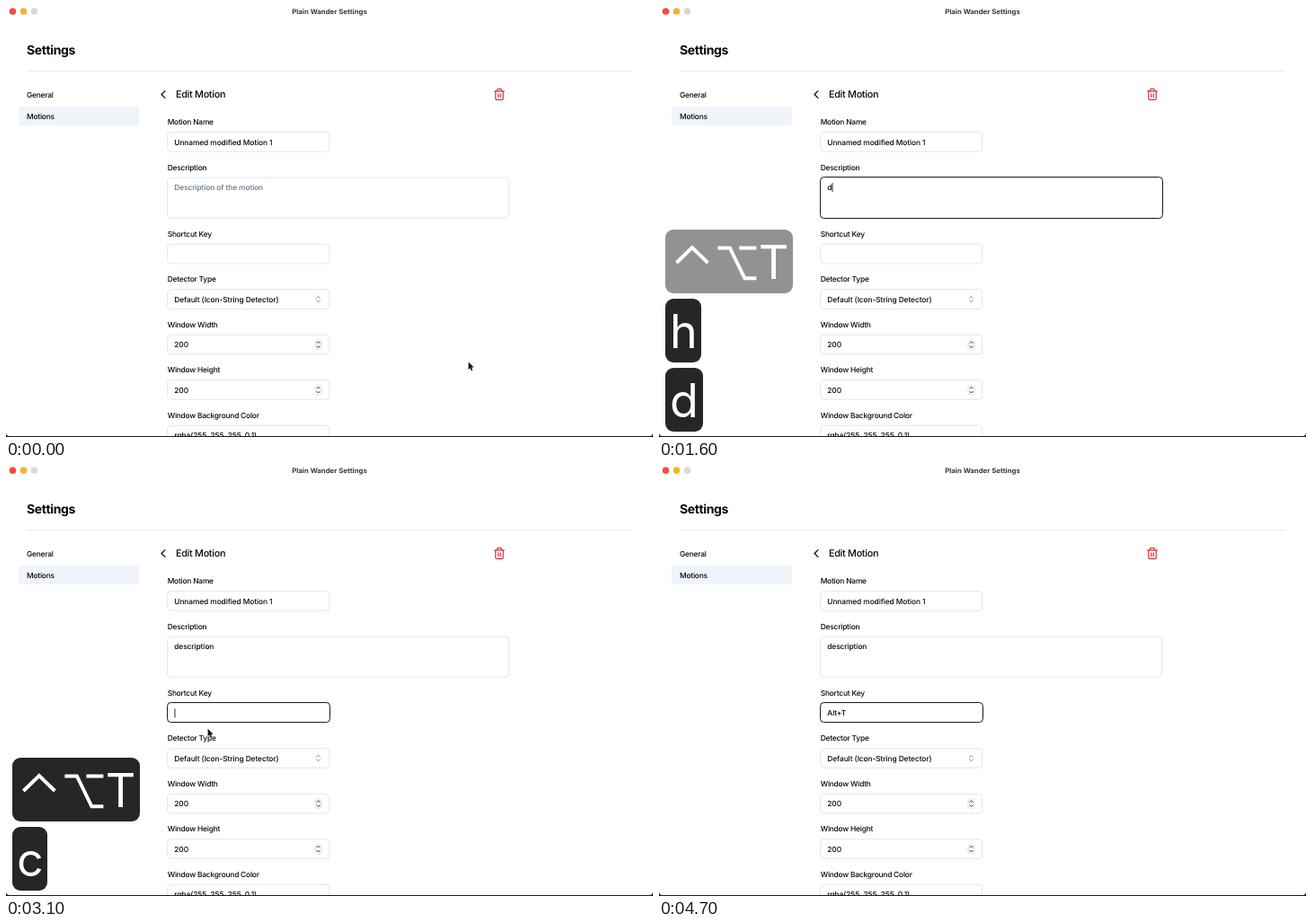
An HTML page for the animation above (4.8 s loop, 720 px wide and 480 px high).

```html
<!DOCTYPE html>
<html lang="en">
<head>
<meta charset="utf-8">
<title>Plain Wander Settings</title>
<style>
  html, body { margin: 0; width: 100%; height: 100%; overflow: hidden; background: #fff; }
  #stage { position: absolute; left: 0; top: 0; display: block; }
  text { font: 450 8.4px Inter, sans-serif; letter-spacing: -.012em; fill: #05070d; white-space: pre; text-rendering: geometricPrecision; }
  .label { font-weight: 550; letter-spacing: -.025em; }
  .hint { fill: #64748b; }
  .title { font-size: 7.8px; font-weight: 700; letter-spacing: 0; fill: #3a3a3a; text-anchor: middle; }
  .head { font-size: 14px; font-weight: 700; letter-spacing: -.025em; }
  .sub { font-size: 10.8px; font-weight: 550; letter-spacing: -.026em; }
  .tag { font: bold 9.5px "DejaVu Sans Mono", monospace; letter-spacing: 0; text-anchor: middle; fill: #15100a; }
  .box { fill: #fff; stroke: #e2e6ec; }
  #ring { fill: none; stroke: #1c202b; }
  .line { fill: none; stroke: #0b0f1a; stroke-width: 2; stroke-linecap: round; stroke-linejoin: round; }
  #keys { position: absolute; left: 6.5px; bottom: 6.5px; display: flex; flex-direction: column; align-items: flex-start; gap: 6.5px; }
  .key { display: flex; box-sizing: border-box; height: 70.5px; padding: 0 7.3px 0 5.6px; border-radius: 9px; background: rgba(0,0,0,.85); color: #fff;
    font: 52px/74px Inter, sans-serif; letter-spacing: -.052em; white-space: pre; overflow: hidden; }
  .key svg { flex: none; height: 70.5px; fill: none; stroke: #fff; stroke-width: 3.9; }
</style>
</head>
<body>
<svg id="stage" width="720" height="480" viewBox="0 0 720 480">
  <circle cx="7.5" cy="6" r="3.8" fill="#fa4a42"/>
  <circle cx="19.5" cy="6" r="3.8" fill="#f5b32e"/>
  <circle cx="31.5" cy="6" r="3.8" fill="#d9d9d9"/>
  <text class="title" x="360" y="8.8">Plain Wander Settings</text>
  <text class="head" x="23" y="54">Settings</text>
  <path d="M23 72.5H697" stroke="#e6e9ee"/>
  <rect x="14" y="112" width="134" height="21" rx="3" fill="#eff3fa"/>
  <text class="label" x="23" y="101.5">General</text>
  <text class="label" x="23" y="125.5">Motions</text>
  <path class="line" transform="translate(167.2 90.7) scale(.65)" d="M15 18 9 12 15 6"/>
  <text class="sub" x="189" y="102">Edit Motion</text>
  <path class="line" style="stroke:#d42f36" transform="translate(541.8 91.2) scale(.6)"
    d="M3 6H21M19 6V20C19 21 18 22 17 22H7C6 22 5 21 5 20V6M8 6V4C8 3 9 2 10 2H14C15 2 16 3 16 4V6M10 11V17M14 11V17"/>
  <g id="form"></g>
  <path class="line" opacity=".6" transform="translate(342.7 321.7) scale(.4)" d="M7 15 12 20 17 15M7 9 12 4 17 9"/>
  <rect id="ring" rx="4"/>
  <rect id="caret" width=".9" height="10" fill="#0b0f1a"/>
  <path d="M0 475.5Q.5 479 4 479H716Q719.5 479 720 475.5V480H0Z" fill="#1c1c1c"/>
  <g id="panel">
    <rect x="-30" y="-30" width="60" height="59.4" fill="#000" fill-opacity=".085"/>
    <g id="tags"></g>
  </g>
  <path id="pointer" d="M.6 1V9.4L2.5 7.7 3.8 10.7 5.3 10 4 7.1H6.6Z" fill="#111" stroke="#fff" stroke-width=".8" paint-order="stroke"/>
</svg>
<div id="keys"></div>
<script>
const LOOP = 4800, STEP = 100;
const $ = id => document.getElementById(id);
const setAll = (el, attrs) => { for (const k in attrs) el.setAttribute(k, attrs[k]); };

// Form: label, label baseline, value, box height, box width
const fields = [
  ['Motion Name', 132, 'Unnamed modified Motion 1'],
  ['Description', 182.5, '', 45, 380],
  ['Shortcut Key', 256.7, ''],
  ['Detector Type', 307.1, 'Default (Icon-String Detector)'],
  ['Window Width', 357.6, '200'],
  ['Window Height', 408.1, '200'],
  ['Window Background Color', 458.6, 'rgba(255, 255, 255, 0.1)']
];
$('form').innerHTML = fields.map(([label, y, value, h = 21.6, w = 180]) => `
  <text class="label" x="179.7" y="${y}">${label}</text>
  <rect class="box" x="179.7" y="${y + 8.6}" width="${w}" height="${h}" rx="3.6"/>
  <text class="value" x="187.3" y="${y + 22.6}">${value}</text>
  ${value === '200' ? `<g transform="translate(347.6 ${y + 19.5})">
    <rect x="-3.7" y="-5.3" width="7.4" height="10.6" rx="3" fill="#fff" stroke="#d6d6d6" stroke-width=".7"/>
    <path class="line" style="stroke-width:.9" d="M-1.7 -1.7 0 -3.4 1.7 -1.7M-1.7 1.7 0 3.4 1.7 1.7"/></g>` : ''}`).join('');
const values = document.querySelectorAll('.value');

$('tags').innerHTML = [...'bcdeafghi'].map((c, i) => {
  const x = (i % 3 - 1) * 23.5, y = (Math.floor(i / 3) - 1) * 23.4 - 1;
  return `<rect x="${x - 3.8}" y="${y - 4.7}" width="7.6" height="9.4" rx="1" fill="#efaa22"/>
    <text class="tag" x="${x}" y="${y + 2.8}">${c}</text>`;
}).join('');

// Typing: [time, characters shown]
const typed = (word, marks, t) => word.slice(0, marks.reduce((n, [at, len]) => t >= at ? len : n, 0));
const describe = t => typed('description', [[1600, 1], [1700, 2], [1800, 4], [1900, 5], [2000, 6], [2100, 8], [2200, 11]], t);
const shortcut = t => typed('Alt+T', [[3300, 1], [3400, 2], [3500, 3], [3700, 4], [3900, 5]], t);

const icon = (w, d) => `<svg width="${w}" viewBox="-1.4 0 ${w} 70.5"><path d="${d}"/></svg>`;
const shift = icon(53, 'M25.8 19 45.5 38H36.2V54H15.4V38H6Z');
const combo = icon(98.7, 'M6 37 23.5 20 41 37M52 20.5H65.5L82 54.3H95M76 20.5H95') + 'T';

// Key badges: first press, last press, content
const presses = [
  [900, 900, () => combo],
  [1400, 1400, () => 'h'],
  [1600, 2200, describe],
  [2600, 2600, () => combo],
  [3000, 3000, () => 'c'],
  [3300, 3500, t => shift + shortcut(t).slice(0, 3)],
  [3700, 3700, () => shift + '='],
  [3900, 3900, () => shift + 'T']
];

function badges(t) {
  return presses.filter(([a, b]) => t >= a && t < b + 800)
    .map(([, b, text]) => `<div class="key" style="opacity:${t < b + 700 ? 1 : .5}">${text(t)}</div>`).join('');
}

const start = [514, 395.5], first = [219, 178.5], second = [224, 292.8];
function pointerAt(t) {
  const mix = (a, b, p) => a.map((v, i) => v + (b[i] - v) * p);
  if (t < 2300) {
    const p = Math.min(1, Math.max(0, (t - 100) / 500));
    return mix(start, first, p * p * (3 - 2 * p));
  }
  return mix(first, second, t < 2400 ? .55 : 1);
}

const show = (el, on) => { el.style.display = on ? '' : 'none'; };
const place = (el, [x, y]) => el.setAttribute('transform', `translate(${x} ${y})`);

function drawFocus(index, empty, caretOn) {
  show($('ring'), index);
  show($('caret'), index && caretOn);
  if (!index) return;
  const [, y, , h = 21.6, w = 180] = fields[index];
  const top = Math.floor(y + 8.6) - .5;
  setAll($('ring'), { x: 179.5, y: top, width: w + 1, height: Math.round(h) + 1 - (h % 1 ? 1 : 0) });
  const width = empty ? 0 : values[index].getComputedTextLength();
  setAll($('caret'), { x: 187.5 + width, y: y + 14.6 });
}

function draw(t) {
  const focus = t < 1500 ? 0 : t < 3100 ? 1 : 2;
  const note = describe(t);
  values[1].textContent = note || 'Description of the motion';
  values[1].classList.toggle('hint', !note);
  values[2].textContent = shortcut(t);
  drawFocus(focus, focus === 1 && !note, t < 4500);

  const opened = t < 2000 ? 1000 : 2700;
  show($('panel'), (t >= 1000 && t < 1500) || (t >= 2700 && t < 3100));
  show($('tags'), t >= opened + 100);
  place($('panel'), t < 2000 ? first : second);

  show($('pointer'), t < 1600 || (t >= 2300 && t < 3300));
  place($('pointer'), pointerAt(t));
  $('keys').innerHTML = badges(t);
}

const began = performance.now();
let last = -1;
function tick() {
  const t = Math.floor((performance.now() - began) % LOOP / STEP) * STEP;
  if (t !== last) draw(last = t);
  requestAnimationFrame(tick);
}
tick();
</script>
</body>
</html>
```
